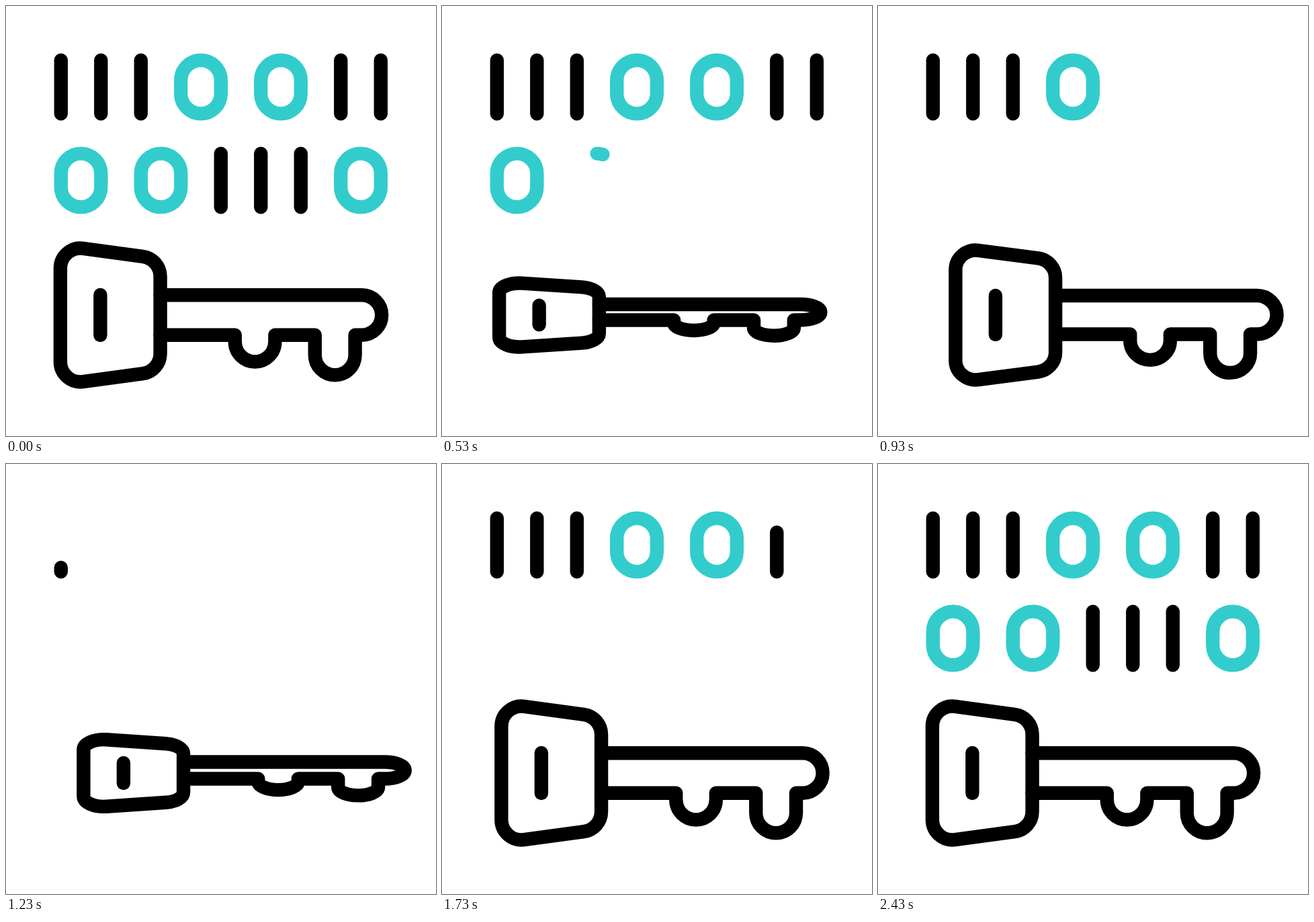
Animation of 640x640 px, one loop 2.5 s. Source, as an HTML page:

```html
<!DOCTYPE html>
<html lang="en">
<head>
<meta charset="utf-8">
<title>Key and binary code</title>
<style>
  html, body { margin: 0; height: 100%; overflow: hidden; background: #fff; }
  svg { display: block; width: 100vw; height: 100vh; }
  path { fill: none; stroke: #000; stroke-width: 20.4; stroke-linecap: round; stroke-linejoin: round; }
  #key path { vector-effect: non-scaling-stroke; }
  .zero { stroke: #3cc; }
</style>
</head>
<body>
<svg viewBox="0 0 640 640">
  <g id="digits"></g>
  <g id="key">
    <path class="head" d="M80.9 390.5A30 30 0 0 1 114.9 360.8L203.5 372.8A30 30 0 0 1 229.6 402.5V517.5A30 30 0 0 1 203.5 547.2L114.9 559.2A30 30 0 0 1 80.9 529.5Z"/>
    <path class="head" d="M140.4 430V490"/>
    <path class="shaft" d="M229.6 430.2H529.4A29.8 29.8 0 0 1 529.4 489.8H519.6V519.4A29.9 29.9 0 0 1 459.8 519.4V489.8H400.4V499.7A29.8 29.8 0 0 1 340.8 499.7V489.8H229.6"/>
  </g>
</svg>
<script>
const FPS = 30, LOOP = 2500;
const digitsGroup = document.getElementById('digits');
const key = document.getElementById('key');
const heads = key.querySelectorAll('.head');
const shaft = key.querySelector('.shaft');

// Keyframes are [frame, value] pairs at 30 frames per second.
const slide = [[0, 0], [10, -51.5], [20, 34.5], [45, 34.5], [55, 0]];
const turn = [[10, 0], [20, 1], [27.2, 0], [34.1, 1], [41, 0]];
const shown = [[1, 13], [16, 8.04], [28, 3.985], [36.8, 0], [47, 3.935], [59, 8.26], [64.5, 10.5], [73, 13]];

const linear = u => u;
const smooth = u => u * u * (3 - 2 * u);

function valueAt(track, frame, ease) {
  const next = track.findIndex(([f]) => f > frame);
  if (next === 0) return track[0][1];
  if (next < 0) return track[track.length - 1][1];
  const [f0, v0] = track[next - 1], [f1, v1] = track[next];
  return v0 + (v1 - v0) * ease((frame - f0) / (f1 - f0));
}

function zeroPath(x, y, side) {
  const r = 29.8, arc = `a${r} ${r} 0 0 ${side > 0 ? 1 : 0} `, dx = side * r;
  return `M${x} ${y}${arc}${dx} ${r}v20${arc}${-2 * dx} 0v-20${arc}${dx} ${-r}`;
}

function buildRow(bits, y, side) {
  let left = 52.05;
  return [...bits].map(bit => {
    const width = bit === '0' ? 119 : 59.5, x = left + width / 2;
    left += width;
    const path = document.createElementNS('http://www.w3.org/2000/svg', 'path');
    path.setAttribute('d', bit === '0' ? zeroPath(x, y, side) : `M${x} ${y + 79.6}v-79.6`);
    path.setAttribute('pathLength', 1);
    if (bit === '0') path.setAttribute('class', 'zero');
    return digitsGroup.appendChild(path);
  });
}

const digits = [...buildRow('1110011', 80.7, -1), ...buildRow('001110', 219.6, 1)];

function squash(path, scale, centre) {
  path.setAttribute('transform', `translate(0 ${centre * (1 - scale)}) scale(1 ${scale})`);
}

function draw(now) {
  const frame = Math.floor((now % LOOP + 4) * FPS / 1000) % 75;

  const count = valueAt(shown, frame, linear);
  digits.forEach((path, i) => {
    const part = Math.min(1, Math.max(0, count - i));
    path.style.display = part ? '' : 'none';
    path.setAttribute('stroke-dasharray', part < 1 ? `${part} 2` : 'none');
  });

  const angle = valueAt(turn, frame, smooth);
  key.setAttribute('transform', `translate(${valueAt(slide, frame, smooth)} 0)`);
  heads.forEach(path => squash(path, 1 - 0.806 * angle, 460));
  squash(shaft, 1 - 0.938 * angle, 453);
}

const start = performance.now();
function tick() {
  draw(performance.now() - start);
  requestAnimationFrame(tick);
}
tick();
</script>
</body>
</html>
```
